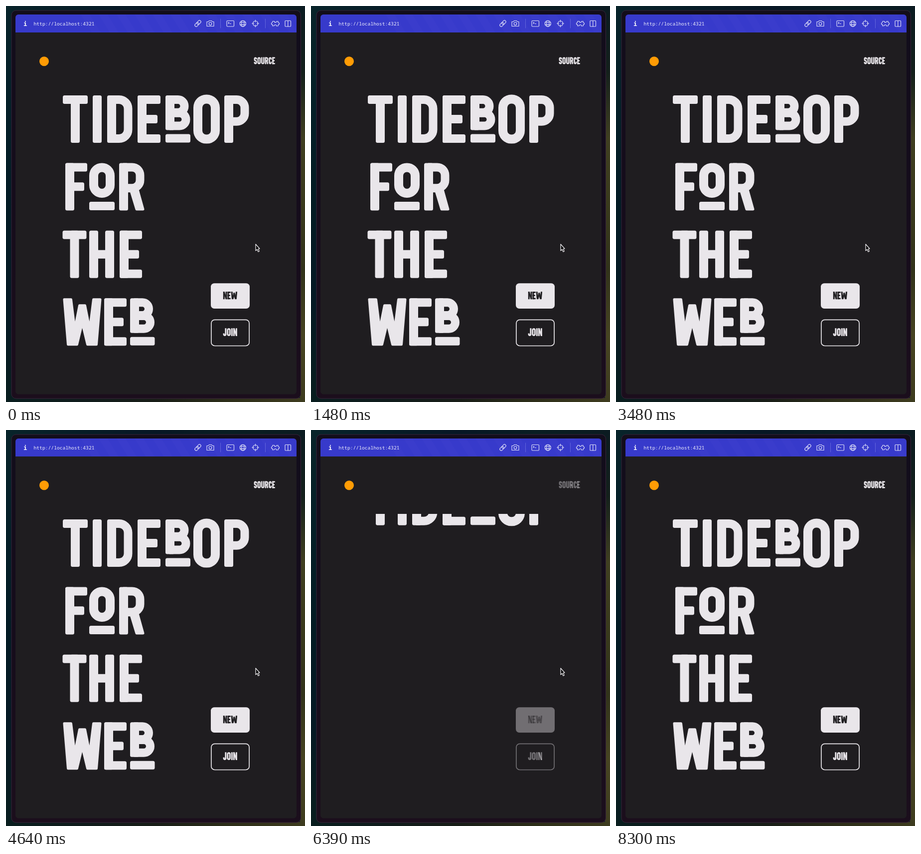
Write an HTML page with a canvas that moves like this. It is 600x793 px and loops after 8330 ms.

```html
<!DOCTYPE html>
<html lang="en">
<head>
<meta charset="utf-8">
<title>Tidebop for the web</title>
<style>
  html, body { margin: 0; width: 100%; height: 100%; overflow: hidden; background: #160d1c; }
  canvas { display: block; width: 600px; height: 793px; }
</style>
</head>
<body>
<canvas id="stage" role="img" aria-label="Tidebop for the web. Source, New, Join"></canvas>
<script>
const W = 600, H = 793, LOOP = 8330;
const LIGHT = '#e9e6ea', DARK = '#1f1d20';
const RELOADS = [2306, 6136];          // moments at which the page goes blank
const DELAY = 150, SLIDE = 700, STAGGER = 107, FADE = 260;
const CURSOR_GONE = 8200;
const ROW = 135.4, MASK_TOP = 168, CAP_TOP = 179;
const STEM = 18, ARM = 17;

const canvas = document.getElementById('stage');
const ctx = canvas.getContext('2d');
const dpr = window.devicePixelRatio || 1;
canvas.width = W * dpr;
canvas.height = H * dpr;

function box(x, y, w, h, r) {
  ctx.beginPath();
  ctx.roundRect(x, y, w, h, r);
}
function bar(x, y, w, h) {
  box(x, y, w, h, 3.5);
  ctx.fill();
}
// Filled polygon with slightly rounded corners.
function poly(...pts) {
  ctx.beginPath();
  pts.forEach(([x, y]) => ctx.lineTo(x, y));
  ctx.closePath();
  ctx.lineWidth = 5;
  ctx.lineJoin = 'round';
  ctx.fill();
  ctx.stroke();
}
// Thick line through points with rounded bends.
function pipe(r, pts, width = ARM) {
  ctx.beginPath();
  ctx.moveTo(...pts[0]);
  for (let i = 1; i < pts.length - 1; i++) ctx.arcTo(...pts[i], ...pts[i + 1], r);
  ctx.lineTo(...pts[pts.length - 1]);
  ctx.lineWidth = width;
  ctx.stroke();
}
function bowl(y, w, h, r = 16) {
  const right = w - STEM / 2, top = y + ARM / 2, low = y + h - ARM / 2;
  pipe(Math.min(r, (low - top) / 2), [[8, top], [right, top], [right, low], [8, low]]);
}

// Each glyph fills a box of the given width and height from the origin.
const glyphs = {
  I: (w, h) => bar(0, 0, STEM, h),
  T: (w, h) => { bar(0, 0, w, ARM); bar((w - STEM) / 2, 0, STEM, h); },
  H: (w, h) => {
    bar(0, 0, STEM, h); bar(w - STEM, 0, STEM, h);
    bar(8, h * 0.41, w - 16, ARM);
  },
  F: (w, h) => {
    bar(0, 0, STEM, h); bar(0, 0, w, ARM);
    bar(0, h * 0.41, w - 6, ARM);
  },
  E: (w, h) => { glyphs.F(w, h); bar(0, h - ARM, w, ARM); },
  D: (w, h) => { bar(0, 0, STEM, h); bowl(0, w, h, 18); },
  P: (w, h) => { bar(0, 0, STEM, h); bowl(0, w, h * 0.64); },
  R: (w, h) => {
    bar(0, 0, STEM, h); bowl(0, w, h * 0.62);
    poly([23, h * 0.56], [37, h * 0.56], [w - 3, h - 2.5], [w - 16, h - 2.5]);
  },
  B: (w, h) => {
    bar(0, 0, STEM, h);
    bowl(0, w - 3, h / 2 + 8); bowl(h / 2 - 8, w, h / 2 + 8);
  },
  O: (w, h) => {
    box(9, 9, w - 18, h - 18, 17);
    ctx.lineWidth = STEM;
    ctx.stroke();
  },
  U: (w, h) => pipe(15, [[9, 0], [9, h - 8], [w - 9, h - 8], [w - 9, 0]], STEM),
  C: (w, h) => pipe(15, [[w - 9, 34], [w - 9, 8], [9, 8], [9, h - 8], [w - 9, h - 8], [w - 9, h - 34]], STEM),
  S: (w, h) => pipe(13, [[w - 9, 30], [w - 9, 8], [9, 8], [9, h / 2], [w - 9, h / 2],
    [w - 9, h - 8], [9, h - 8], [9, h - 30]], STEM),
  J: (w, h) => pipe(14, [[w - 9, 0], [w - 9, h - 8], [9, h - 8], [9, h - 32]], STEM),
  N: (w, h) => {
    bar(0, 0, STEM, h); bar(w - STEM, 0, STEM, h);
    poly([3, 3], [15, 3], [w - 3, h - 3], [w - 15, h - 3]);
  },
  W: (w, h) => {
    const mid = w / 2;
    poly([2.5, 2.5], [16, 2.5], [23.5, 62], [mid - 5.5, 14.5], [mid + 5.5, 14.5], [w - 23.5, 62],
      [w - 16, 2.5], [w - 2.5, 2.5], [w - 10, h - 2.5], [w - 28, h - 2.5], [mid, 49], [28, h - 2.5], [10, h - 2.5]);
  }
};

function glyph(ch, x, y, w, h = 95) {
  ctx.save();
  ctx.translate(x, y);
  glyphs[ch](w, h);
  ctx.restore();
}
// Raised short letter with a bar beneath.
function raised(ch, x, y, w) {
  glyph(ch, x, y, w, 69.5);
  bar(x, y + 77.5, w, ARM);
}
function ink(color) {
  ctx.fillStyle = ctx.strokeStyle = color;
}

const WIDTHS = { S: 42, O: 46, U: 46, R: 46, C: 43, E: 39, N: 48, W: 77, J: 41, I: 18 };
function label(text, cx, y, scale) {
  const gap = 6;
  const total = [...text].reduce((sum, c) => sum + WIDTHS[c] + gap, -gap);
  ctx.save();
  ctx.translate(cx - total * scale / 2, y);
  ctx.scale(scale, scale);
  let x = 0;
  for (const c of text) {
    glyph(c, x, 0, WIDTHS[c]);
    x += WIDTHS[c] + gap;
  }
  ctx.restore();
}

const lines = [
  y => {
    glyph('T', 114, y, 50); glyph('I', 174, y, 18); glyph('D', 203, y, 51);
    glyph('E', 264, y, 46); raised('B', 320, y, 50);
    glyph('O', 376, y - 1.5, 53, 98); glyph('P', 438, y, 50);
  },
  y => { glyph('F', 119, y, 44); raised('O', 167, y, 51); glyph('R', 227, y, 51); },
  y => { glyph('T', 113.5, y, 48); glyph('H', 167, y, 50); glyph('E', 228, y, 45); },
  y => { glyph('W', 114.5, y, 77); glyph('E', 197, y, 45); raised('B', 249, y, 49.5); }
];

function gradient(x0, y0, x1, y1, ...colors) {
  const g = ctx.createLinearGradient(x0, y0, x1, y1);
  colors.forEach((c, i) => g.addColorStop(i / (colors.length - 1), c));
  return g;
}

function backdrop() {
  ctx.fillStyle = gradient(0, 0, 0, H, '#08242a', '#041f28', '#031b24', '#051924', '#091e1f');
  ctx.fillRect(0, 0, W, H);
  ctx.fillStyle = gradient(590, 0, 590, H, '#0b1b21', '#14201c', '#403f21', '#3a3a1d', '#32331b', '#474422', '#3e3c1f');
  ctx.fillRect(590, 0, 10, H);
  ctx.fillStyle = gradient(0, 0, W, 0, '#08242a', '#061d27', '#071725', '#091e23', '#0b1b21');
  ctx.fillRect(0, 0, W, 10);
  ctx.fillStyle = gradient(0, 0, W, 0, '#091e1f', '#0f1b1b', '#181d17', '#2d2e19', '#3e3c1f');
  ctx.fillRect(0, 785, W, 8);

  box(11, 9, 580.5, 777, 9);
  ctx.fillStyle = gradient(0, 9, 0, 786, '#120d1b', '#150c1b', '#1b0e1c');
  ctx.fill();
  ctx.lineWidth = 1;
  ctx.strokeStyle = '#38243a';
  ctx.stroke();
  box(19, 17, 564, 760.5, 6);
  ctx.fillStyle = DARK;
  ctx.fill();
}

function line(...pts) {
  ctx.beginPath();
  pts.forEach(([x, y], i) => i ? ctx.lineTo(x, y) : ctx.moveTo(x, y));
  ctx.stroke();
}
function ring(x, y, rx, ry = rx) {
  ctx.beginPath();
  ctx.ellipse(x, y, rx, ry, 0, 0, Math.PI * 2);
  ctx.stroke();
}
function frame(x, y, w, h, r) {
  box(x, y, w, h, r);
  ctx.stroke();
}

function icons() {
  ctx.save();
  ctx.strokeStyle = '#dfe0f8';
  ctx.lineWidth = 1.15;
  ctx.lineCap = ctx.lineJoin = 'round';

  // chain link
  ctx.save();
  ctx.translate(385, 35);
  ctx.rotate(-Math.PI / 4);
  frame(-7.5, -2.8, 9, 5.6, 2.8);
  frame(-1.5, -2.8, 9, 5.6, 2.8);
  ctx.restore();

  // camera
  ctx.beginPath();
  [[403, 31.5], [406, 31.5], [407.5, 29.5], [412.5, 29.5], [414, 31.5], [417, 31.5], [417, 40.5], [403, 40.5]]
    .forEach(p => ctx.lineTo(...p));
  ctx.closePath();
  ctx.stroke();
  ring(410, 35.5, 2.8);

  // terminal
  frame(443, 29.5, 14.5, 11.5, 1.5);
  line([446, 32.5], [447.8, 34], [446, 35.5]);
  line([449.5, 35.5], [451.5, 35.5]);

  // globe
  ring(475.3, 35.2, 6);
  ring(475.3, 35.2, 2.7, 6);
  line([469.8, 33], [480.8, 33]);
  line([469.8, 37.4], [480.8, 37.4]);

  // crosshair
  ring(500.5, 35, 5);
  for (const [dx, dy] of [[1, 0], [-1, 0], [0, 1], [0, -1]])
    line([500.5 + dx * 3, 35 + dy * 3], [500.5 + dx * 7, 35 + dy * 7]);

  // puzzle piece
  ctx.beginPath();
  ctx.moveTo(535, 30.5);
  ctx.lineTo(538.5, 30.5);
  ctx.arc(540.5, 31, 2, Math.PI, 0, true);
  ctx.lineTo(546, 30.5);
  ctx.lineTo(546, 33.2);
  ctx.arc(546.5, 35.2, 2, -Math.PI / 2, Math.PI / 2);
  ctx.lineTo(546, 40);
  ctx.lineTo(542.5, 40);
  ctx.arc(540.5, 39.5, 2, 0, Math.PI, true);
  ctx.lineTo(535, 40);
  ctx.lineTo(535, 37.2);
  ctx.arc(534.5, 35.2, 2, Math.PI / 2, -Math.PI / 2);
  ctx.closePath();
  ctx.stroke();

  // split view
  frame(560, 29.5, 11.5, 11.5, 1);
  line([565.8, 29.5], [565.8, 41]);

  ctx.strokeStyle = '#6265dc';
  ctx.lineWidth = 1;
  line([430.5, 26], [430.5, 44]);
  line([520.5, 26], [520.5, 44]);
  ctx.restore();
}

function toolbar() {
  ctx.save();
  box(19, 17, 564, 36, [6, 6, 0, 0]);
  ctx.clip();
  ctx.fillStyle = '#373acb';
  ctx.fillRect(19, 17, 564, 36);
  ctx.fillStyle = 'rgba(70, 70, 205, 0.2)';
  for (let x = 150; x < 600; x += 36) {
    ctx.beginPath();
    ctx.moveTo(x, 17);
    ctx.lineTo(x + 18, 17);
    ctx.lineTo(x + 40, 53);
    ctx.lineTo(x + 22, 53);
    ctx.fill();
  }
  ctx.restore();

  ctx.fillStyle = '#fff';
  ctx.font = 'bold 12px "DejaVu Sans Mono", monospace';
  ctx.fillText('i', 35, 39.5);
  ctx.fillStyle = '#f3f3fd';
  ctx.font = '500 9.7px "Noto Sans Mono", "DejaVu Sans Mono", monospace';
  ctx.fillText('http://localhost:4321', 55.5, 39);
  icons();
}

function cursor() {
  ctx.beginPath();
  [[501, 477], [501, 490], [504, 487.4], [506, 492.2], [508.2, 491.2], [506.2, 486.6], [509, 486]]
    .forEach(p => ctx.lineTo(...p));
  ctx.closePath();
  ctx.lineJoin = 'round';
  ctx.lineWidth = 1.2;
  ctx.fillStyle = '#0b0b0c';
  ctx.strokeStyle = '#f4f2f5';
  ctx.fill();
  ctx.stroke();
}

function headline(age) {
  ink(LIGHT);
  lines.forEach((drawLine, i) => {
    const u = Math.min(1, Math.max(0, (age - i * STAGGER) / SLIDE));
    if (u === 0) return;
    ctx.save();
    ctx.beginPath();
    ctx.rect(100, MASK_TOP + i * ROW, 400, ROW);
    ctx.clip();
    drawLine(CAP_TOP + i * ROW - ROW * (1 - u) ** 3);
    ctx.restore();
  });
}

function controls(alpha) {
  ctx.save();
  ctx.globalAlpha = alpha;
  ink(LIGHT);
  label('SOURCE', 518.7, 102.6, 0.145);
  box(411, 555.3, 78, 50.7, 7);
  ctx.fill();
  box(411.9, 628.3, 76.2, 52.2, 7);
  ctx.lineWidth = 1.7;
  ctx.stroke();
  label('JOIN', 449.7, 645.2, 0.165);
  ink(DARK);
  label('NEW', 449.9, 572, 0.16);
  ctx.restore();
}

function draw(now) {
  const t = now % LOOP;
  const last = RELOADS.filter(r => r <= t).pop();
  const age = last === undefined ? Infinity : t - last - DELAY;

  ctx.setTransform(dpr, 0, 0, dpr, 0, 0);
  backdrop();
  toolbar();
  ctx.fillStyle = '#ff9c05';
  ctx.beginPath();
  ctx.arc(76.5, 110.7, 9.5, 0, Math.PI * 2);
  ctx.fill();
  if (age > 0) {
    headline(age);
    controls(Math.min(1, age / FADE));
  }
  if (t < CURSOR_GONE) cursor();
}

function tick() {
  draw(performance.now());
  requestAnimationFrame(tick);
}
tick();
</script>
</body>
</html>
```
